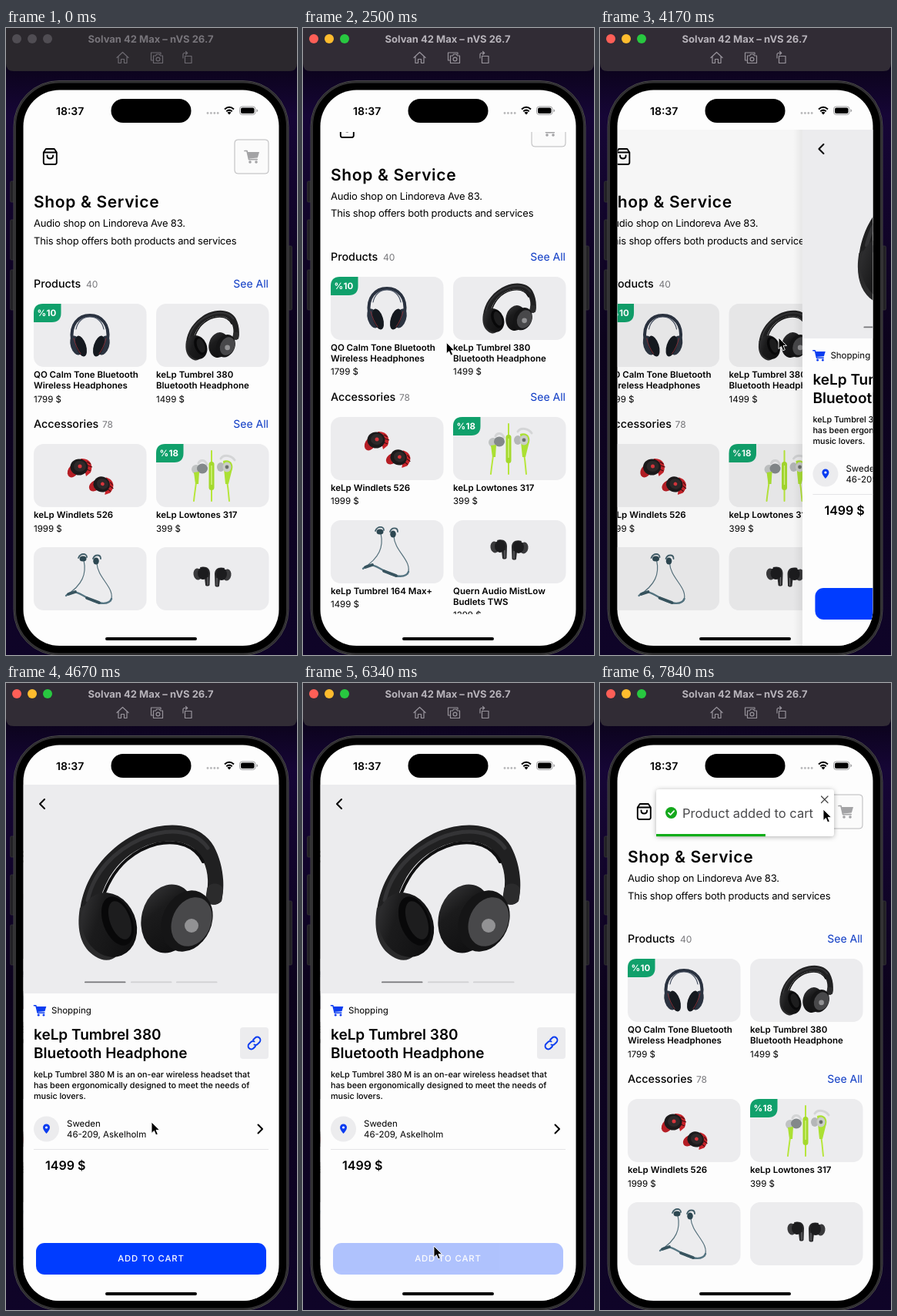
Recreate the animation shown at these times as an HTML page. Size 378 by 814 pixels, loop 8 s.

```html
<!DOCTYPE html>
<html lang="en">
<head>
<meta charset="utf-8">
<title>Shop app demo</title>
<style>
  html, body { margin: 0; width: 100%; height: 100%; overflow: hidden; background: #0d041e; }
  svg.stage { display: block; width: 378px; height: 814px; }
  text { font-family: Inter, "Liberation Sans", sans-serif; fill: #000; white-space: pre; text-rendering: geometricPrecision; }
  .h1 { font-size: 21px; font-weight: 600; letter-spacing: .65px; }
  .body { font-size: 13px; letter-spacing: -.18px; }
  .sec { font-size: 14.3px; font-weight: 500; }
  .count { font-size: 12px; fill: #77777b; }
  .link { font-size: 14px; fill: #0a38c4; text-anchor: end; }
  .name { font-size: 11.5px; font-weight: 600; }
  .price { font-size: 11.5px; }
  .badge { font-size: 11.5px; font-weight: 700; fill: #fff; letter-spacing: .2px; }
  .title { font-size: 19px; font-weight: 600; }
  .desc { font-size: 10.8px; font-weight: 500; letter-spacing: -.05px; }
  .small { font-size: 11.5px; }
  .cost { font-size: 16px; font-weight: 600; }
  .add { font-size: 11.3px; font-weight: 500; fill: #fff; letter-spacing: .9px; text-anchor: middle; }
  .bar { font-size: 13px; font-weight: 700; text-anchor: middle; }
  .line { fill: none; stroke-linecap: round; stroke-linejoin: round; }
</style>
</head>
<body>
<svg class="stage" viewBox="0 0 378 814">
  <defs>
    <linearGradient id="wall" x2="0" y2="1">
      <stop offset=".06" stop-color="#0b031b"/><stop offset=".14" stop-color="#160636"/>
      <stop offset=".5" stop-color="#0c031c"/><stop offset="1" stop-color="#0f0428"/>
    </linearGradient>
    <linearGradient id="cup" x2="1" y2="1">
      <stop offset="0" stop-color="#3a3a3c"/><stop offset=".35" stop-color="#1b1b1c"/><stop offset="1" stop-color="#0c0c0d"/>
    </linearGradient>
    <linearGradient id="edge">
      <stop offset="0" stop-color="#000" stop-opacity="0"/><stop offset="1" stop-color="#000" stop-opacity=".06"/>
    </linearGradient>
    <clipPath id="screen"><rect x="22.500" y="80.500" width="332" height="721.500" rx="47"/></clipPath>
    <clipPath id="page"><rect x="22.500" y="132" width="332" height="670"/></clipPath>
    <clipPath id="list"><rect x="22.500" y="135" width="332" height="626"/></clipPath>
    <filter id="soft" x="-10%" y="-20%" width="120%" height="150%">
      <feDropShadow dx="0" dy="1" stdDeviation="3" flood-opacity=".3"/>
    </filter>

    <g id="cart">
      <path class="line" d="M1 1.5h3l2.6 11.2h10.5" stroke="currentColor" stroke-width="1.7"/>
      <path d="M4.800 3H20l-2.200 7.400L6.500 11.400z" fill="currentColor"/>
      <circle cx="8" cy="16" r="1.800" fill="currentColor"/><circle cx="16" cy="16" r="1.800" fill="currentColor"/>
    </g>

    <!-- over-ear set, centred on 0,0 -->
    <g id="over">
      <path d="M-92 24C-87-24-52-62-13-79C27-95 66-88 82-60C94-38 97-10 92 11C87 18 73 17 71 9C76-10 75-28 68-41C58-64 34-71 4-64C-30-54-58-28-68 18Z" fill="#202021"/>
      <path class="line" d="M-82 10C-74-26-48-54-12-70C24-85 58-81 74-58" stroke="#343436" stroke-width="5"/>
      <path class="line" d="M-60 0C-46-36-20-56 8-63C36-69 58-60 68-40" stroke="#101011" stroke-width="4"/>
      <path d="M73-4C74-14 92-14 94-4L92 11C87 18 73 17 71 9Z" fill="#2b2b2c"/>
      <path d="M-92 20C-97 50-90 72-72 83C-62 90-50 89-44 82L-66 6Z" fill="#2a2a2b"/>
      <ellipse cx="-54" cy="42" rx="35" ry="43" transform="rotate(-22 -54 42)" fill="url(#cup)"/>
      <ellipse cx="-43" cy="37" rx="19" ry="33" transform="rotate(-20 -43 37)" fill="#080809"/>
      <ellipse cx="-40" cy="36" rx="13" ry="26" transform="rotate(-20 -40 36)" fill="#1d1d1e"/>
      <ellipse cx="23" cy="34" rx="35" ry="45" transform="rotate(14 23 34)" fill="url(#cup)"/>
      <ellipse cx="47" cy="37" rx="32" ry="41" transform="rotate(24 47 37)" fill="#151516"/>
      <ellipse cx="53" cy="38" rx="25" ry="33" transform="rotate(24 53 38)" fill="#48484a"/>
      <circle cx="53" cy="43" r="9" fill="#929294"/>
    </g>

    <g id="bass">
      <path class="line" d="M-23 6C-26-14-15-26 0-26S26-14 23 6" stroke="#2a3240" stroke-width="4"/>
      <path class="line" d="M-18-8C-16-18-9-24 0-24S16-18 18-8" stroke="#475162" stroke-width="1.200"/>
      <g id="side">
        <ellipse cx="-18" cy="13" rx="7" ry="13" transform="rotate(-18 -18 13)" fill="#2b3340"/>
        <ellipse cx="-11.500" cy="14" rx="6.500" ry="14" transform="rotate(-18 -11.500 14)" fill="#15191f"/>
        <path class="line" d="M-21 4Q-18 16-12 24" stroke="#8a3038" stroke-width=".9"/>
      </g>
      <use href="#side" transform="scale(-1 1)"/>
    </g>

    <g id="redbud">
      <path d="M3-12C15-13 20-4 16 6L10 11L7-2Z" fill="#c9242b"/>
      <path d="M11-8L16-5M12-3L18-1M11 2L16 4" stroke="#4a0d10" stroke-width="1.200"/>
      <ellipse cx="-7" cy="4" rx="6.500" ry="9" transform="rotate(30 -7 4)" fill="#b51e25"/>
      <ellipse cx="1" cy="-1" rx="11.500" ry="10.500" fill="#1c1a1b"/>
      <ellipse cx="2" cy="-2" rx="8" ry="7" fill="#2e292a"/>
      <circle cx="2" cy="-2" r="2.500" fill="#d8353c"/>
    </g>
    <g id="airbuds">
      <use href="#redbud" transform="translate(-15 -10)"/>
      <use href="#redbud" transform="translate(14 12) rotate(20) scale(.95)"/>
    </g>

    <g id="wired">
      <path class="line" d="M-20 0C-21 12-23 22-24 33M18 0C20 12 21 20 22 33M-1-32V33" stroke="#b7e63c" stroke-width="2"/>
      <rect x="-4.500" y="-18" width="7" height="37" rx="3.500" fill="#a4d92d"/>
      <path d="M-1-13V12" stroke="#d8f58b" stroke-width="1.300"/>
      <path class="line" d="M11-22C15-28 25-26 29-20M-18-16C-16-21-9-21-7-14" stroke="#d4d5d6" stroke-width="3"/>
      <ellipse cx="-21" cy="-8" rx="6" ry="6" fill="#c0c3c3"/>
      <ellipse cx="-13" cy="-9" rx="7" ry="6.500" fill="#83888a"/>
      <path d="M-24-4L-17-5L-18 11H-22Z" fill="#abe033"/>
      <ellipse cx="11" cy="-11" rx="5" ry="6" fill="#b5b7b8"/>
      <path d="M14-19C24-22 29-14 25-5L21 11H17Z" fill="#abe033"/>
      <ellipse cx="19" cy="-11" rx="5.500" ry="6.500" fill="#c9ccc8"/>
      <circle cx="19" cy="-11" r="2.400" fill="#6b706b"/>
    </g>

    <g id="neck">
      <path class="line" d="M-8-24C-4-6-10 8-30 21M9-20C10 0 34 12 27 29" stroke="#56717c" stroke-width="1.200"/>
      <path class="line" d="M-31 22C-18 9-6 27 10 31C20 33 26 32 28 26" stroke="#557582" stroke-width="2.400"/>
      <path class="line" d="M-28 20L-19 17M-4 25L12 31" stroke="#38545f" stroke-width="3.800"/>
      <path class="line" d="M-15-27C-12-34-4-33-4-28M4-26C6-32 14-32 14-26" stroke="#425e69" stroke-width="1.800"/>
      <ellipse cx="-9" cy="-26" rx="4.500" ry="3.500" fill="#2d4751"/>
      <ellipse cx="8" cy="-23" rx="3.800" ry="4.500" fill="#2d4751"/>
    </g>

    <g id="stem">
      <path d="M-16-15C-8-17-3-14-3-7L-3.500 8C-4 10-9 10-9 8L-10-1Z" fill="#29292b"/>
      <path d="M-6-2V8" stroke="#6c6c6f" stroke-width="1.200"/>
      <ellipse cx="-19" cy="-6" rx="5.500" ry="7.500" transform="rotate(-10 -19 -6)" fill="#3a3a3c"/>
      <ellipse cx="-12" cy="-7" rx="7" ry="8" fill="#1c1c1e"/>
    </g>
    <g id="tws">
      <use href="#stem"/>
      <use href="#stem" transform="translate(0 1) scale(-1 1)"/>
    </g>
  </defs>

  <rect width="378" height="814" fill="url(#wall)"/>

  <!-- device -->
  <g fill="#222125" stroke="#343337" stroke-width=".8">
    <rect x="5.500" y="199" width="7" height="27" rx="1.500"/><rect x="5.500" y="249" width="7" height="52" rx="1.500"/>
    <rect x="5.500" y="314" width="7" height="52" rx="1.500"/><rect x="366" y="283" width="5.500" height="83" rx="1.500"/>
  </g>
  <rect x="10" y="68.500" width="357" height="746" rx="59" fill="#1c1c1d" stroke="#4b4a4c"/>
  <rect x="12" y="70.500" width="353" height="742" rx="57" fill="#000" stroke="#333234" stroke-width="2"/>

  <g clip-path="url(#screen)">
    <rect x="22" y="80" width="333" height="722" fill="#fdfdfd"/>
    <g clip-path="url(#page)">
      <g id="home"><g clip-path="url(#list)"><g id="feed"></g></g></g>
      <rect id="dim" x="22" y="132" width="333" height="670"/>
      <g id="detail">
        <rect x="10.500" y="132" width="12" height="670" fill="url(#edge)"/>
        <rect x="22.500" y="132" width="332" height="670" fill="#fdfdfd"/>
        <g id="info"></g>
        <g id="buy">
          <rect x="39" y="727" width="299" height="41" rx="11" fill="#003cff"/>
          <text class="add" x="188.500" y="751">ADD TO CART</text>
        </g>
      </g>
    </g>
    <text x="65" y="112.500" font-size="14" font-weight="600">18:37</text>
    <g fill="#b9b9bb"><circle cx="262" cy="110.500" r="1.400"/><circle cx="266.400" cy="110.500" r="1.400"/><circle cx="270.800" cy="110.500" r="1.400"/><circle cx="275.200" cy="110.500" r="1.400"/></g>
    <path class="line" d="M284 105.500Q290 100 296 105.500M286.300 108.300Q290 105 293.700 108.300" stroke="#000" stroke-width="2" style="stroke-linecap:butt"/>
    <path d="M287.500 109.800Q290 107.800 292.500 109.800L290 112.500Z"/>
    <rect x="303.500" y="102" width="20.500" height="10.500" rx="3.300" fill="none" stroke="#9b9b9d"/>
    <rect x="305" y="103.500" width="17.500" height="7.500" rx="2"/>
    <path d="M325.500 105.300q1.600.6 1.600 2t-1.600 2z" fill="#9b9b9d"/>
    <g id="toast">
      <rect x="73" y="138" width="231" height="61" rx="4" fill="#fff" filter="url(#soft)"/>
      <circle cx="92.500" cy="168.500" r="7.500" fill="#14a81c"/>
      <path class="line" d="M89 168.700l2.500 2.500 4.600-5" stroke="#fff" stroke-width="1.700"/>
      <text x="107" y="175" font-size="16.500" style="fill:#4a4a4c">Product added to cart</text>
      <path class="line" d="M287.500 147l8.500 8.500m0-8.500l-8.500 8.500" stroke="#444" stroke-width="1.200"/>
      <rect id="left" x="73" y="196" height="3.200" fill="#12ad1a"/>
    </g>
    <rect x="129" y="791" width="119" height="4" rx="2"/>
  </g>
  <rect x="136.500" y="92" width="104" height="31" rx="15.500"/>

  <!-- window bar -->
  <path id="bar" d="M0 0H378V46Q378 56 368 56H10Q0 56 0 46Z"/>
  <circle class="lamp" cx="14" cy="14" r="6"/><circle class="lamp" cx="34" cy="14" r="6"/><circle class="lamp" cx="54" cy="14" r="6"/>
  <text id="caption" class="bar" x="188" y="18.500">Solvan 42 Max – nVS 26.7</text>
  <g id="tools" class="line" stroke-width="1.200">
    <path d="M144 38.500l7.500-7 7.500 7M146 37v8.500h3.500v-5h4v5h3.500v-8.500"/>
    <path d="M191 42h-2.500v-10h12.500v2M191.500 36h3l1.200-2h3.600l1.200 2h3v9.500h-12z"/><circle cx="197.500" cy="40.500" r="2.400"/>
    <path d="M232.500 36.500h8.500v9h-8.500zM230 39v-4.500q0-2 2-2h3.500M233.500 30.500l2.200 2-2.200 2"/>
  </g>

  <path id="cursor" d="M0 0V14.500L3.400 11.400L5.700 16.800L8.300 15.700L6 10.400H10.500Z" stroke="#fff" stroke-width=".9"/>
</svg>

<script>
const $ = id => document.getElementById(id);
const text = (x, y, cls, s) => `<text x="${x}" y="${y}" class="${cls}">${s}</text>`;
const pic = (id, x, y, k = 1) => `<use href="#${id}" transform="translate(${x} ${y}) scale(${k})"/>`;

function card(x, y, art, k, names, price, off) {
  const tag = off ? `<path d="M${x} ${y + 24}V${y + 12}q0-12 12-12h23.500v12q0 12-12 12z" fill="#10a06b"/>`
    + text(x + 4.500, y + 16, 'badge', off) : '';
  return `<rect x="${x}" y="${y}" width="146.500" height="82" rx="13" fill="#ececee"/>` + pic(art, x + 73, y + 41, k) + tag
    + names.map((n, i) => text(x, y + 96 + i * 14, 'name', n)).join('')
    + text(x, y + 99.5 + names.length * 14, 'price', price);
}

const section = (y, name, n, nx) =>
  text(36, y, 'sec', name) + text(nx, y, 'count', n) + text(341, y, 'link', 'See All');

const bag = `<g class="line" stroke="#000" stroke-width="1.900"><path d="M48.800 161.500v13q0 2.500 2.500 2.500h12q2.500 0 2.500-2.500v-13l-3-4.500h-11zM49 161.500h16.500M53.500 165.500q0 4 3.800 4t3.800-4"/></g>`;

$('feed').innerHTML = bag
  + '<rect x="297" y="145" width="44" height="44" rx="4" fill="#fbfbfb" stroke="#b9b9bb"/>'
  + '<g color="#a3a3a5">' + pic('cart', 309, 158) + '</g>'
  + text(36, 233, 'h1', 'Shop &amp; Service')
  + text(36, 258, 'body', 'Audio shop on Lindoreva Ave 83.')
  + text(36, 280.500, 'body', 'This shop offers both products and services')
  + section(337, 'Products', 40, 104)
  + card(36, 358, 'bass', 1, ['QO Calm Tone Bluetooth', 'Wireless Headphones'], '1799 $', '%10')
  + card(195, 358, 'over', .37, ['keLp Tumbrel 380', 'Bluetooth Headphone'], '1499 $')
  + section(519, 'Accessories', 78, 125)
  + card(36, 540, 'airbuds', 1, ['keLp Windlets 526'], '1999 $')
  + card(195, 540, 'wired', 1, ['keLp Lowtones 317'], '399 $', '%18')
  + card(36, 674, 'neck', 1, ['keLp Tumbrel 164 Max+'], '1499 $')
  + card(195, 674, 'tws', 1, ['Quern Audio MistLow', 'Budlets TWS'], '1299 $');

$('info').innerHTML = '<rect x="22.500" y="132" width="332" height="271" fill="#ececee"/>'
  + '<path class="line" d="M50 151l-6 6 6 6" stroke="#000" stroke-width="2"/>'
  + pic('over', 188, 272)
  + [102, 162, 221].map((x, i) => `<rect x="${x}" y="387.500" width="53.500" height="1.800" rx=".9" fill="${i ? '#d0d0d2' : '#77777a'}"/>`).join('')
  + '<g color="#0a3cf0">' + pic('cart', 35.500, 417.500, .84) + '</g>'
  + text(59, 429, 'small', 'Shopping')
  + text(36, 463, 'title', 'keLp Tumbrel 380') + text(36, 487, 'title', 'Bluetooth Headphone')
  + '<rect x="304" y="447" width="37" height="41" rx="4" fill="#ececee"/>'
  + '<g class="line" stroke="#0a3cf0" stroke-width="2" transform="translate(322.500 467.500) rotate(-45)"><path d="M-2 4h-3.500a4 4 0 0 1 0-8h3.500a4 4 0 0 1 3.500 2.500M2-4h3.500a4 4 0 0 1 0 8h-3.500a4 4 0 0 1-3.500-2.500"/></g>'
  + ['keLp Tumbrel 380 M is an on-ear wireless headset that', 'has been ergonomically designed to meet the needs of', 'music lovers.']
    .map((s, i) => text(36, 512 + 14 * i, 'desc', s)).join('')
  + '<circle cx="52.500" cy="579" r="16.500" fill="#ececee"/>'
  + '<path d="M52.500 585q-4.500-5-4.500-8a4.500 4.500 0 0 1 9 0q0 3-4.500 8z" fill="#0a3cf0"/><circle cx="52.500" cy="577" r="1.600" fill="#fff"/>'
  + text(79, 576, 'small', 'Sweden') + text(79, 590, 'small', '46-209, Askelholm')
  + '<path class="line" d="M327.500 573.500l5.500 5.500-5.500 5.500" stroke="#000" stroke-width="2"/>'
  + '<path d="M36 605.500H341" stroke="#e4e4e6"/>'
  + text(51, 632, 'cost', '1499 $');

// [ms, value...] steps, eased between neighbours
const feedY = [[840, 0], [1600, -104], [2000, -104], [2850, 5], [3150, 4], [3340, 2], [3670, 0]];
const infoY = [[5100, 0], [5480, -24], [5670, -20], [6100, 0]];
const toastY = [[6760, -118], [6840, -14], [6960, 3], [7100, 0]];
const mouse = [[840, 160, 436], [1600, 179, 327], [2000, 180, 328], [2850, 190, 455], [3400, 190, 455], [3700, 232, 402],
  [4200, 232, 402], [4640, 189, 570], [5100, 189, 570], [5480, 186, 546], [5670, 186, 551], [6150, 170, 731], [7340, 170, 731], [7840, 290, 164]];

function at(steps, t, c = 1) {
  const i = steps.findIndex(s => s[0] > t);
  if (i === 0) return steps[0][c];
  if (i < 0) return steps[steps.length - 1][c];
  const a = steps[i - 1], b = steps[i], p = (t - a[0]) / (b[0] - a[0]);
  return a[c] + (b[c] - a[c]) * p * p * (3 - 2 * p);
}
const easeOut = (t, start, span) => 1 - (1 - Math.min(1, Math.max(0, (t - start) / span))) ** 3;
const move = (id, x, y) => $(id).setAttribute('transform', `translate(${x.toFixed(2)} ${y.toFixed(2)})`);
const show = (id, on) => $(id).setAttribute('visibility', on ? 'visible' : 'hidden');
const lamps = [...document.querySelectorAll('.lamp')];
const WIDE = 332;

function draw(t) {
  const active = t >= 840;
  $('bar').style.fill = active ? '#312c35' : '#2b282d';
  $('caption').style.fill = active ? '#b7b3ba' : '#77747a';
  $('tools').style.stroke = active ? '#98949c' : '#6c6970';
  lamps.forEach((l, i) => l.style.fill = active ? ['#fe5f57', '#febc2e', '#28c840'][i] : '#504d53');

  const open = easeOut(t, 4120, 500) - easeOut(t, 6550, 500);
  move('home', -.3 * WIDE * open, 0);
  move('detail', WIDE * (1 - open), 0);
  show('detail', open > 0);
  $('dim').style.opacity = .1 * open;
  move('feed', 0, at(feedY, t));
  move('info', 0, at(infoY, t));
  $('buy').style.opacity = t >= 6340 ? .3 : 1;

  show('toast', t >= 6760);
  move('toast', 0, at(toastY, t));
  $('left').setAttribute('width', 231 * Math.max(0, Math.min(1, 1 - (t - 6767) / 2785)));

  show('cursor', active);
  move('cursor', at(mouse, t, 1), at(mouse, t, 2));
}

const start = performance.now();
function tick(now) {
  draw(Math.max(0, now - start) % 8000);
  requestAnimationFrame(tick);
}
draw(0);
requestAnimationFrame(tick);
</script>
</body>
</html>
```
